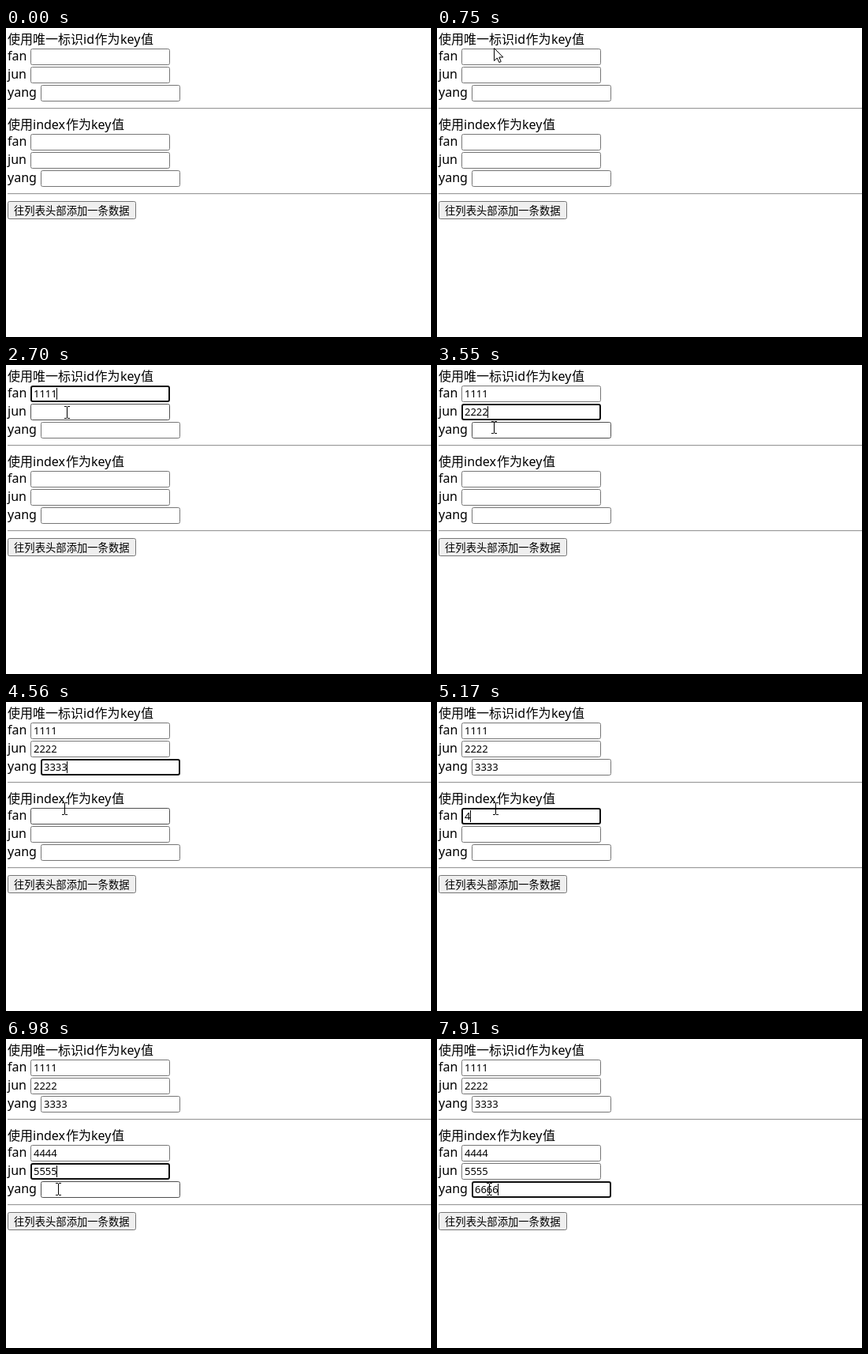
Recreate the animation shown at these times as an HTML page. Size 539x391 px, loop 8000 ms.

```html
<!DOCTYPE html>
<html lang="zh-CN">
<head>
<meta charset="utf-8">
<style>
html, body { margin: 0; width: 100%; height: 100%; overflow: hidden; background: #fff; }
svg { display: block; }
text { font: 16px "Noto Sans", "Noto Sans CJK SC", "Noto Sans CJK", sans-serif; }
.value { font-size: 13px; }
.button { font-size: 13.333px; }
</style>
</head>
<body>
<svg id="stage" width="539" height="391" viewBox="0 0 539 391">
  <text y="20"><tspan x="2">使用唯一标识</tspan><tspan x="98">id</tspan><tspan x="112.5">作为</tspan><tspan x="145">key</tspan><tspan x="171">值</tspan></text>
  <text y="128"><tspan x="2">使用</tspan><tspan x="34">index</tspan><tspan x="76">作为</tspan><tspan x="108">key</tspan><tspan x="134">值</tspan></text>
  <path d="M2 101.5H539M2 209.5H539" stroke="#9a9a9a"/>
  <path d="M2 102.5H539M2 210.5H539" stroke="#eee"/>
  <rect x="2.5" y="219.5" width="162" height="22" rx="2" fill="#efefef" stroke="#767676"/>
  <text class="button" x="10" y="235.5">往列表头部添加一条数据</text>
</svg>
<script>
const LOOP = 8000, ENTER = 120, TRAVEL = 230, STEP = 78, FLASH = 70, BLINK = 550;
const KEYS = 4, KEY_GAP = 170, DIGIT_W = 7.415;
const BOX_W = 177, BOX_H = 21;
const stage = document.getElementById('stage');

function set(el, attrs) {
  for (const k in attrs) el.setAttribute(k, attrs[k]);
}
function add(tag, attrs, text = '') {
  const el = document.createElementNS('http://www.w3.org/2000/svg', tag);
  set(el, attrs);
  el.textContent = text;
  return stage.appendChild(el);
}
const show = (el, on) => set(el, { visibility: on ? 'visible' : 'hidden' });

// the pointer reaches (px, py), clicks there, and the last digit lands at `typed`
const fields = [
  { px: 82, py: 34, reach: 1210, click: 1440, typed: 2470 },
  { px: 77, py: 60, reach: 2700, click: 2780, typed: 3400 },
  { px: 72, py: 79, reach: 3550, click: 3720, typed: 4560 },
  { px: 74, py: 135, reach: 4320, click: 4790, typed: 5570 },
  { px: 67, py: 168, reach: 5640, click: 5800, typed: 6650 },
  { px: 66, py: 190, reach: 6980, click: 7130, typed: 7910 }
];
fields.forEach((f, i) => {
  const row = i % 3;
  f.x = row === 2 ? 44 : 31;
  f.y = (i < 3 ? 26 : 134) + row * 23;
  f.start = i ? f.reach - TRAVEL : ENTER;
  f.digit = String(i + 1);
  add('text', { x: 2, y: f.y + 15 }, ['fan', 'jun', 'yang'][row]);
  f.frame = add('rect', { fill: '#fff', rx: 2 });
  f.value = add('text', { class: 'value', x: f.x + 4, y: f.y + 15 });
});
const caret = add('rect', { width: 1, height: 15 });
const beam = add('path', { d: 'M-3-7.5H0M1-7.5H4M.5-7V7M-3 7.5H0M1 7.5H4', stroke: '#000', fill: 'none' });
const arrow = add('path', { d: 'M.5.5V16.5L4.3 13 6.8 18.5 9.2 17.5 6.8 12H11.8Z', stroke: '#000', fill: '#fff' });
const flash = add('circle', { r: 12, fill: '#ff0', 'fill-opacity': .5 });

// runs slightly past the end and settles back
const easeBack = u => 1 + 2 * (u - 1) ** 3 + (u - 1) ** 2;

function pointer(t) {
  let x = 454, y = 381;
  for (const f of fields) {
    if (t < f.start) break;
    const held = Math.floor((t - f.start) / STEP) * STEP;
    const p = t >= f.reach ? 1 : easeBack(held / (f.reach - f.start));
    x += (f.px - x) * p;
    y += (f.py - y) * p;
  }
  return [Math.round(x), Math.round(y)];
}

const inside = (px, py, x, y, w, h) => px >= x && px < x + w && py >= y && py < y + h;

function keyCount(f, t) {
  const left = Math.ceil((f.typed - t) / KEY_GAP);
  return Math.max(0, Math.min(KEYS, KEYS - left));
}

function draw(t) {
  const [px, py] = pointer(t);
  const active = fields.filter(f => t >= f.click).pop();
  let overText = inside(px, py, 2, 3, 185, 21) || inside(px, py, 2, 111, 148, 21);

  for (const f of fields) {
    const over = t >= ENTER && inside(px, py, f.x, f.y, BOX_W, BOX_H);
    const line = f === active ? 2 : 1;
    overText ||= over;
    set(f.frame, {
      x: f.x + line / 2, y: f.y + line / 2, width: BOX_W - line, height: BOX_H - line,
      'stroke-width': line,
      stroke: f === active ? '#101010' : over ? '#4f4f4f' : '#767676'
    });
    f.value.textContent = f.digit.repeat(keyCount(f, t));
  }

  show(caret, false);
  show(flash, active && t < active.click + FLASH);
  if (active) {
    const n = keyCount(active, t);
    const last = n ? active.typed - (KEYS - n) * KEY_GAP : active.click;
    set(caret, { x: Math.floor(active.x + 4 + n * DIGIT_W), y: active.y + 3 });
    show(caret, (t - last) % (2 * BLINK) < BLINK);
  }
  set(flash, { cx: px - 2, cy: py - 1 });
  for (const c of [beam, arrow]) set(c, { transform: `translate(${px} ${py})` });
  show(beam, t >= ENTER && overText);
  show(arrow, t >= ENTER && !overText);
}

const began = performance.now();
function tick() {
  draw((performance.now() - began) % LOOP);
  requestAnimationFrame(tick);
}
tick();
</script>
</body>
</html>
```
